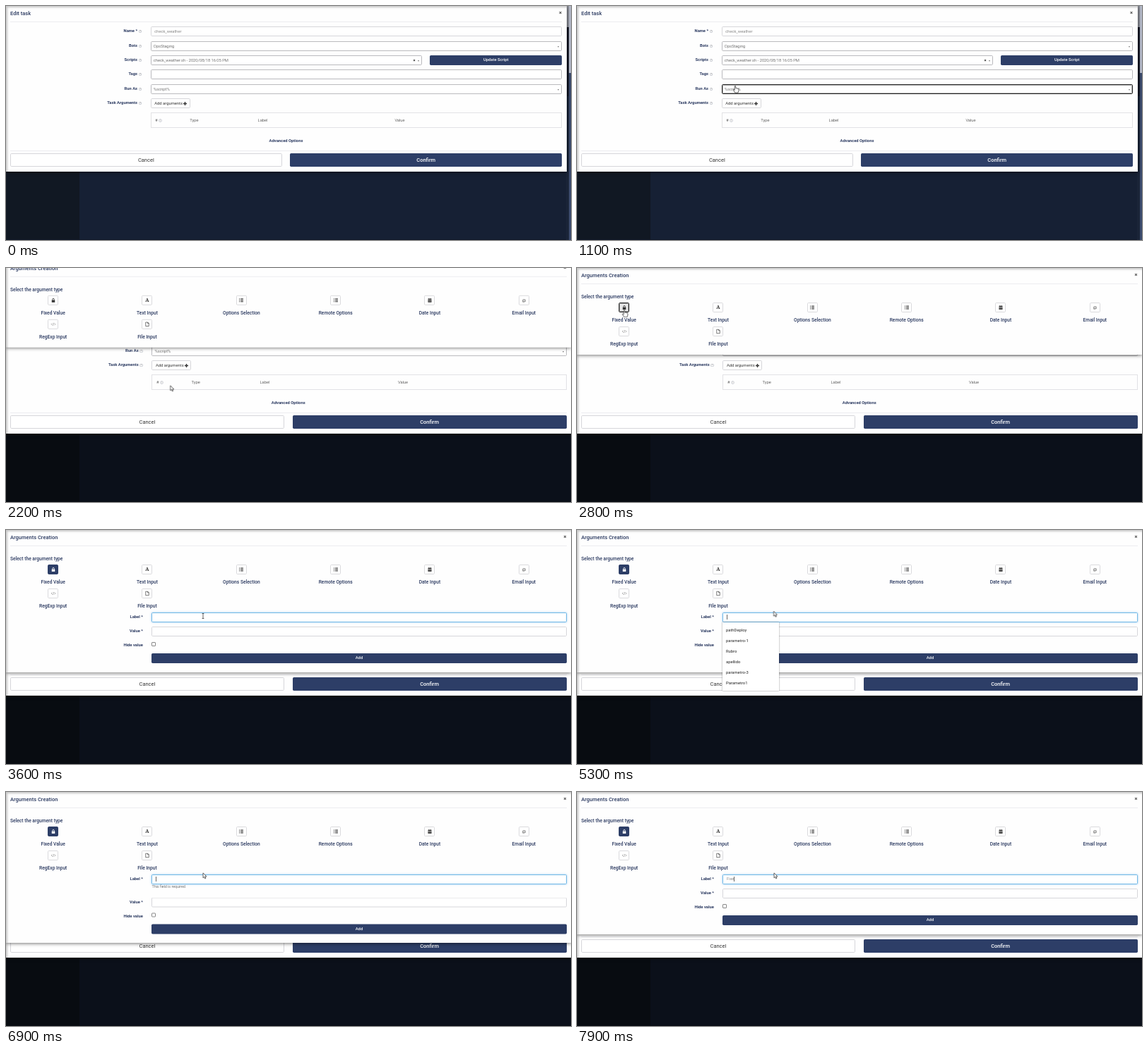
These frames come from a looping animation (800x332 px, 8 s). An HTML page:

```html
<!DOCTYPE html>
<html lang="en">
<head>
<meta charset="utf-8">
<title>Edit task</title>
<style>
:root { --navy: #2d3e67; --ink: #2a3960; --focus: inset 0 0 0 1px rgba(0,0,0,.3); }
* { box-sizing: border-box; }
html, body { margin: 0; width: 100%; height: 100%; overflow: hidden; }
body { font: 400 5.83px/1 Roboto, sans-serif; color: #333; background: #162034; }
#stage { position: absolute; left: 0; top: 0; width: 800px; height: 332px; overflow: hidden; }
#stage * { white-space: nowrap; }
#stage div, .abs, .cur, .cur svg { position: absolute; }
svg { display: block; overflow: visible; }
.step { animation: 8s step-end infinite; }

/* page behind the panels */
.side { left: 0; top: 0; width: 104px; height: 332px; background: #111823; }
.base { left: 0; top: 331px; width: 800px; height: 1px; background: #111827; }
.dim { inset: 0; background: #000; opacity: 0; animation: dim 8s linear infinite; }
.bar { left: 793px; top: 0; width: 7px; height: 332px; background: linear-gradient(#8b8e97 30px, #141a28 30px 128px, #1a2438 128px); animation-name: bar; }
.bar i { position: absolute; right: 0; top: 0; width: 3px; height: 332px; background: linear-gradient(#b4b9c8 95px, #3b4a6c 95px); }

/* panels */
.panel { left: 0; top: 0; width: 800px; background: #fefefe; box-shadow: 0 1px 5px rgba(0,0,0,.55), inset 2px 2px 3px rgba(0,0,0,.22); }
.main { height: 235px; animation-name: wide; }
.modal { height: 123px; opacity: 0; animation: grow 8s step-end infinite, fade 8s linear infinite, drop 8s linear infinite; }
#stage .in { left: 6px; right: 6.5px; top: 0; height: 100%; }
.title { left: 0; top: 7px; font-size: 7.5px; font-weight: 500; color: var(--ink); }
.close { right: 0; top: 6px; font-size: 7.5px; font-weight: 700; color: #444; }
.rule { left: 0; right: 0; height: 1px; background: #ececf0; }

.row { left: 0; right: 0; height: 14px; }
.row > b { position: absolute; right: calc(74.55% + 12.5px); top: 0; line-height: 13.5px; font-weight: 700; color: var(--ink); }
.row > b.q::after { content: "?"; display: inline-block; width: 4.6px; height: 4.6px; margin-left: 1.6px; border-radius: 50%; box-shadow: inset 0 0 0 .6px #b4b8c2; font: 400 3.4px/4.6px Roboto, sans-serif; text-align: center; color: #888; vertical-align: .2px; }
.field { left: 25.45%; right: 0; top: 0; height: 14px; padding: 0 3px; border: 1px solid #bababe; border-radius: 1.7px; background: #fff; font-weight: 300; line-height: 12.5px; color: #333; }
.soft { border-color: #d6d6da; padding: 0 4.5px; color: #555; }
.pick::after { content: ""; position: absolute; right: 2.6px; top: 5.5px; border: 1.5px solid transparent; border-top: 2px solid #777; border-bottom: 0; }
.btn { height: 14px; border-radius: 1.7px; background: var(--navy); color: #fff; font-weight: 500; text-align: center; line-height: 13.6px; }
.plain { background: #fff; border: 1px solid #d6d6da; color: #333; font-weight: 400; line-height: 12px; }
.big { top: 209px; height: 19.4px; width: 49.25%; font-size: 7.5px; line-height: 19px; }
.big.plain { line-height: 18px; }
.add { left: 25.45%; width: 56px; animation-name: addFocus; }
.add svg { position: absolute; left: 45.5px; top: 3.6px; fill: none; stroke: #333; stroke-width: 1.4; }
.run { animation-name: runFocus; }
.table { left: 25.45%; right: 0; top: 151px; height: 22px; border: 1px solid #e2e2e5; line-height: 20px; font-weight: 300; color: #222; }
.more { left: 0; right: 0; top: 188.5px; text-align: center; font-weight: 700; color: var(--ink); }

/* argument types */
.head { left: 0; top: 37.7px; font-size: 6.67px; font-weight: 500; color: var(--ink); }
.type { width: 133.33px; height: 32px; text-align: center; font-size: 6.67px; font-weight: 500; color: var(--ink); }
.type span { position: absolute; left: 0; right: 0; top: 22.3px; }
.type i { position: absolute; left: 59.2px; top: 0; width: 15px; height: 14px; border: 1px solid #dadadd; border-radius: 1.7px; background: #fff; color: #333; font: 700 7px/12px "Noto Serif", serif; }
.type svg { position: absolute; left: 3.5px; top: 3px; width: 6px; height: 6px; fill: currentColor; }
.type .lock { animation-name: lock; }

.form { left: 0; right: 0; top: 0; height: 215px; visibility: hidden; animation-name: form; }
.low { left: 0; right: 0; top: 0; animation-name: shift; }
.tick { left: 25.45%; top: 2px; width: 5.5px; height: 5.5px; border: 1px solid #888; border-radius: 1px; background: #fff; }
.err { left: 25.45%; top: 131.7px; font-size: 5.42px; font-weight: 300; color: #333; visibility: hidden; animation-name: err; }
.entry { display: flex; align-items: center; animation-name: glow; }
.entry span { font-size: 0; }
.ch1 { animation-name: ch1; }
.ch2 { animation-name: ch2; }
.ch3 { animation-name: ch3; }
.caret { width: .7px; height: 7px; background: #666; opacity: 0; animation-name: caret; }

.list { left: 206px; top: 131px; width: 80px; padding: 3.5px 5px; background: #fff; box-shadow: 0 0 2px rgba(0,0,0,.45); line-height: 15px; color: #222; visibility: hidden; }
.list p { margin: 0; }
.all { height: 97px; animation-name: all; }
.one { height: 22px; animation-name: one; }

/* pointer */
.cur { left: 0; top: 0; opacity: 0; animation: move 8s ease-in-out infinite, seen 8s step-end infinite; }
.cur svg { fill: #fff; stroke: #222; stroke-linejoin: round; opacity: 0; }
.arrow { animation-name: arrow; }
.hand { animation-name: hand; }
.beam { animation-name: beam; }

@keyframes dim { 0%, 23% { opacity: 0; } 24.7%, 100% { opacity: .5; } }
@keyframes bar { 0% { visibility: visible; } 23.7% { visibility: hidden; } }
@keyframes wide { 0% { width: 793.5px; } 23.7% { width: 800px; } }
@keyframes grow { 0% { height: 123px; } 36% { height: 201.5px; } 81.9% { height: 214px; } 89.4% { height: 201.5px; } }
@keyframes fade { 0%, 24.75% { opacity: 0; } 26.6%, 100% { opacity: 1; } }
@keyframes drop { 0% { transform: translateY(-83px); } 24.87% { transform: translateY(-83px); animation-timing-function: ease-out; } 28.6%, 100% { transform: none; } }
@keyframes runFocus { 0% { box-shadow: none; border-color: #bababe; } 12.4% { box-shadow: var(--focus); border-color: #222; } 18.7% { box-shadow: none; border-color: #bababe; } }
@keyframes addFocus { 0% { background: #fff; border-color: #d6d6da; box-shadow: none; } 18.7% { background: #e6e6e6; border-color: #222; box-shadow: var(--focus); } 26.2% { background: #fff; border-color: #d6d6da; box-shadow: none; } }
@keyframes lock { 0% { background: #fff; border-color: #dadadd; color: #333; } 34.3% { background: #e6e6e6; border-color: #222; color: #333; box-shadow: var(--focus); } 36% { background: #2d3e67; border-color: #2d3e67; color: #fff; box-shadow: none; } }
@keyframes form { 0% { visibility: hidden; } 36% { visibility: visible; } }
@keyframes shift { 0% { transform: none; } 81.9% { transform: translateY(12.5px); } 89.4% { transform: none; } }
@keyframes err { 0% { visibility: hidden; } 81.9% { visibility: visible; } 89.4% { visibility: hidden; } }
@keyframes glow { 0% { border-color: #d6d6da; box-shadow: none; } 44.5% { border-color: #72b9e6; box-shadow: 0 0 3px rgba(102,175,233,.7); } }
@keyframes ch1 { 0% { font-size: 0; } 68.5% { font-size: 5.83px; } 81.2% { font-size: 0; } 89.4% { font-size: 5.83px; } }
@keyframes ch2 { 0% { font-size: 0; } 96.1% { font-size: 5.83px; } }
@keyframes ch3 { 0% { font-size: 0; } 98.6% { font-size: 5.83px; } }
@keyframes caret { 0% { opacity: 0; } 49.9% { opacity: 1; } 57.4% { opacity: 0; } 63.7% { opacity: 1; } 76.2% { opacity: 0; } 81.2% { opacity: 1; } 87.4% { opacity: 0; } 89.4% { opacity: 1; } }
@keyframes all { 0% { visibility: hidden; } 46.2% { visibility: visible; } 68.5% { visibility: hidden; } }
@keyframes one { 0% { visibility: hidden; } 68.5% { visibility: visible; } 81.2% { visibility: hidden; } 89.4% { visibility: visible; } 96.1% { visibility: hidden; } }
@keyframes seen { 0% { opacity: 0; } 1.2% { opacity: 1; } }
@keyframes arrow { 0% { opacity: 1; } 10.6% { opacity: 0; } 20.6% { opacity: 1; } 33% { opacity: 0; } 36.8% { opacity: 1; } 43.1% { opacity: 0; } 56.2% { opacity: 1; } }
@keyframes hand { 0% { opacity: 0; } 10.6% { opacity: 1; } 20.6% { opacity: 0; } 33% { opacity: 1; } 36.8% { opacity: 0; } }
@keyframes beam { 0% { opacity: 0; } 43.1% { opacity: 1; } 56.2% { opacity: 0; } }
@keyframes move {
  0%, 1.2% { transform: translate(797px, 170px); }
  11.25%, 14.4% { transform: translate(224px, 113px); }
  18.5%, 20% { transform: translate(236px, 135px); }
  22.5% { transform: translate(268px, 196px); }
  25% { transform: translate(267.5px, 189.3px); }
  33.7%, 36.2% { transform: translate(67px, 59.5px); }
  43.7%, 54.4% { transform: translate(279px, 122px); }
  58.1%, 73.5% { transform: translate(278.5px, 115.2px); }
  73.7%, 100% { transform: translate(279px, 114.8px); }
}
</style>
</head>
<body>
<div id="stage">
  <div class="side"></div>
  <div class="base"></div>
  <div class="dim"></div>
  <div class="bar step"><i></i></div>

  <div class="panel main step">
    <div class="in">
      <div class="title">Edit task</div>
      <div class="close">×</div>
      <div class="rule" style="top:22px"></div>
      <div class="row" style="top:29px"><b class="q">Name *</b><div class="field soft">check_weather</div></div>
      <div class="row" style="top:50px"><b class="q">Bots</b><div class="field pick">OpsStaging</div></div>
      <div class="row" style="top:70px"><b class="q">Scripts</b>
        <div class="field pick" style="right:25.4%">check_weather.sh - 2020/08/18 16:05 PM<b class="abs" style="right:8px;color:#222">×</b></div>
        <div class="btn" style="left:76.1%;right:0">Update Script</div>
      </div>
      <div class="row" style="top:90px"><b class="q">Tags</b><div class="field"></div></div>
      <div class="row" style="top:111px"><b class="q">Run As</b><div class="field pick run step">%script%</div></div>
      <div class="row" style="top:131px"><b class="q">Task Arguments</b>
        <div class="btn plain add step"><span class="abs" style="left:4.5px">Add arguments</span><svg width="5" height="5"><path d="M2.5 0v5M0 2.5h5"/></svg></div>
      </div>
      <div class="table">
        <span class="abs" style="left:5.5px"># <svg class="abs" style="left:5.2px;top:7.6px" width="5" height="5"><circle cx="2.5" cy="2.5" r="2" fill="none" stroke="#b4b8c2" stroke-width=".6"/><path d="M1.8 2q.7-1 1.3 0l-.6 .8v.8" fill="none" stroke="#999" stroke-width=".4"/></svg></span>
        <span class="abs" style="left:9.4%">Type</span>
        <span class="abs" style="left:26%">Label</span>
        <span class="abs" style="left:59.4%">Value</span>
      </div>
      <div class="more">Advanced Options</div>
      <div class="rule" style="top:205px"></div>
      <div class="btn plain big" style="left:0">Cancel</div>
      <div class="btn big" style="right:0">Confirm</div>
    </div>
  </div>

  <div class="panel modal">
    <div class="in">
      <div class="title">Arguments Creation</div>
      <div class="close">×</div>
      <div class="rule" style="top:22px"></div>
      <div class="head">Select the argument type</div>
    </div>
    <div class="type" style="left:0;top:49px"><i class="lock step"><svg viewBox="0 0 12 12"><path d="M1.5 5.5h9V12h-9z"/><path d="M3.5 6V3.5a2.5 2.5 0 0 1 5 0V6" fill="none" stroke="currentColor" stroke-width="1.7"/></svg></i><span>Fixed Value</span></div>
    <div class="type" style="left:133.3px;top:49px"><i>A</i><span>Text Input</span></div>
    <div class="type" style="left:266.7px;top:49px"><i><svg viewBox="0 0 12 12"><path id="lines" d="M0 1h2v2H0zM4 1h8v2H4zM0 5h2v2H0zM4 5h8v2H4zM0 9h2v2H0zM4 9h8v2H4z"/></svg></i><span>Options Selection</span></div>
    <div class="type" style="left:400px;top:49px"><i><svg viewBox="0 0 12 12"><use href="#lines"/></svg></i><span>Remote Options</span></div>
    <div class="type" style="left:533.3px;top:49px"><i><svg viewBox="0 0 12 12"><path d="M1 1.5h2V0h1.5v1.5h3V0H9v1.5h2V4H1zM1 5h10v7H1z"/><path d="M3 7h6M3 9.6h6" stroke="#fff" stroke-dasharray="1.4 .9"/></svg></i><span>Date Input</span></div>
    <div class="type" style="left:666.7px;top:49px"><i style="font:400 6px/11.5px Roboto,sans-serif">@</i><span>Email Input</span></div>
    <div class="type" style="left:0;top:82.7px"><i><svg viewBox="0 0 12 12" style="fill:none;stroke:#666"><path d="M3 3L0 6l3 3M9 3l3 3-3 3M7.2 2L4.8 10"/></svg></i><span>RegExp Input</span></div>
    <div class="type" style="left:133.3px;top:82.7px"><i><svg viewBox="0 0 12 12" style="fill:none;stroke:#333;stroke-width:1.3"><path d="M1.5 .5h6l3 3v8h-9zM7.3 .5v3.2h3.2"/></svg></i><span>File Input</span></div>

    <div class="in">
      <div class="form step">
        <div class="row" style="top:116.5px"><b>Label *</b>
          <div class="field soft entry step"><span class="ch1 step">F</span><span class="ch2 step">ix</span><span class="ch3 step">e</span><i class="caret step"></i></div>
        </div>
        <div class="err step">This field is required.</div>
        <div class="low step">
          <div class="row" style="top:137px"><b>Value *</b><div class="field soft"></div></div>
          <div class="row" style="top:157px"><b>Hide value</b><div class="tick"></div></div>
          <div class="btn" style="left:25.45%;right:0;top:174.7px">Add</div>
        </div>
      </div>
    </div>
  </div>

  <div class="list all step"><p>pathDeploy</p><p>parametro-1</p><p>Rubro</p><p>apellido</p><p>parametro-3</p><p>Parametro1</p></div>
  <div class="list one step"><p>Fecha</p></div>

  <div class="cur">
    <svg class="arrow step" width="6" height="9" stroke-width=".7"><path d="M0 0v7l1.6-1.4 1.1 2.5 1.2-.5-1.1-2.5H5z"/></svg>
    <svg class="hand step" width="9" height="11" stroke-width=".7"><path d="M-.8 .8q.8-1.4 1.6 0v3q.8-.6 1.4 .2 .8-.5 1.4 .3 1.3-.2 1.3 1v2.2L4 10H-.2L-2.8 6.3q0-1.2 1-.7l1 .9z"/></svg>
    <svg class="beam step" width="4" height="8" stroke-width=".7"><path d="M-1.4-3.5h2.8M0-3.5v7M-1.4 3.5h2.8" fill="none"/></svg>
  </div>
</div>
</body>
</html>
```
